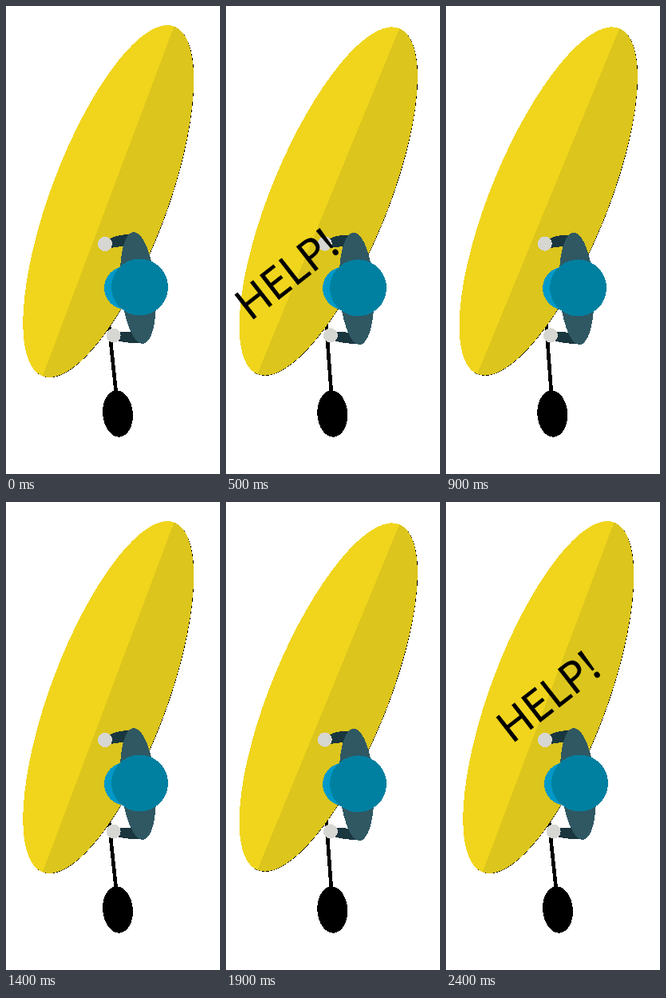
Animation of 268x586 px, one loop 2600 ms. Source, as an HTML page:

```html
<!DOCTYPE html>
<html lang="en">
<head>
<meta charset="utf-8">
<title>Kayak</title>
<style>
  html, body { margin: 0; width: 100%; height: 100%; overflow: hidden; background: #fff; }
  svg { display: block; width: 268px; height: 586px; shape-rendering: crispEdges; }
  text { font: 54px "Open Sans", "Noto Sans", sans-serif; stroke: #000; stroke-width: .6; }
</style>
</head>
<body>
<svg viewBox="0 0 268 586">
  <g id="paddle">
    <path d="M118.5 300 L138 486" stroke="#000" stroke-width="4.6"/>
    <ellipse cx="140" cy="510.5" rx="18.9" ry="29.2" transform="rotate(-5 140 510.5)"/>
  </g>
  <g id="board">
    <ellipse rx="233.9" ry="72.8" transform="translate(128.6 244.8) rotate(-69.4)"/>
    <g transform="translate(128.2 244.5) rotate(-69.4)">
      <ellipse rx="233.9" ry="72.8" fill="#f0d51c"/>
      <path d="M-233.9 0 A233.9 72.8 0 0 0 233.9 0 Z" fill="#dcc51c"/>
    </g>
  </g>
  <g id="rower">
    <path d="M127 293 Q142 284 160 287 L160 300 Q142 300.5 127 304 Z" fill="#1a363f"/>
    <path d="M135 407 Q150 408.5 166 408 L171 422 Q152 423 135 418 Z" fill="#1a363f"/>
    <ellipse cx="165.5" cy="353" rx="21.7" ry="70.2" transform="rotate(-5 165.5 353)" fill="#2f5862"/>
    <circle cx="124" cy="298" r="9" fill="#d6d6d2"/>
    <circle cx="134.7" cy="412.5" r="9" fill="#d6d6d2"/>
    <circle cx="150" cy="353" r="27" fill="#0099c8"/>
    <circle cx="167.5" cy="352" r="35.5" fill="#0080a1"/>
  </g>
  <text id="cry">HELP!</text>
</svg>
<script>
  const LOOP = 2600;
  const TILT = 1.75;
  const near = [30.6, 395.2];
  const far = [82.6, 303.2];

  // start time, tilted pose, place of the cry
  const steps = [
    [0, false, null],
    [500, true, near],
    [700, false, null],
    [900, true, null],
    [1400, false, null],
    [1900, true, null],
    [2100, false, far]
  ];

  const get = id => document.getElementById(id);
  const cry = get("cry");
  const pivots = { board: "128.2 244.5", rower: "135 290", paddle: "135 290" };
  let shown = null;

  function show([, tilted, place]) {
    for (const id in pivots) {
      get(id).setAttribute("transform", `rotate(${tilted ? TILT : 0} ${pivots[id]})`);
    }
    cry.setAttribute("visibility", place ? "visible" : "hidden");
    if (place) cry.setAttribute("transform", `translate(${place}) rotate(-38)`);
  }

  function draw() {
    const t = performance.now() % LOOP;
    const step = steps.findLast(s => s[0] <= t);
    if (step !== shown) show(shown = step);
    requestAnimationFrame(draw);
  }
  draw();
</script>
</body>
</html>
```
